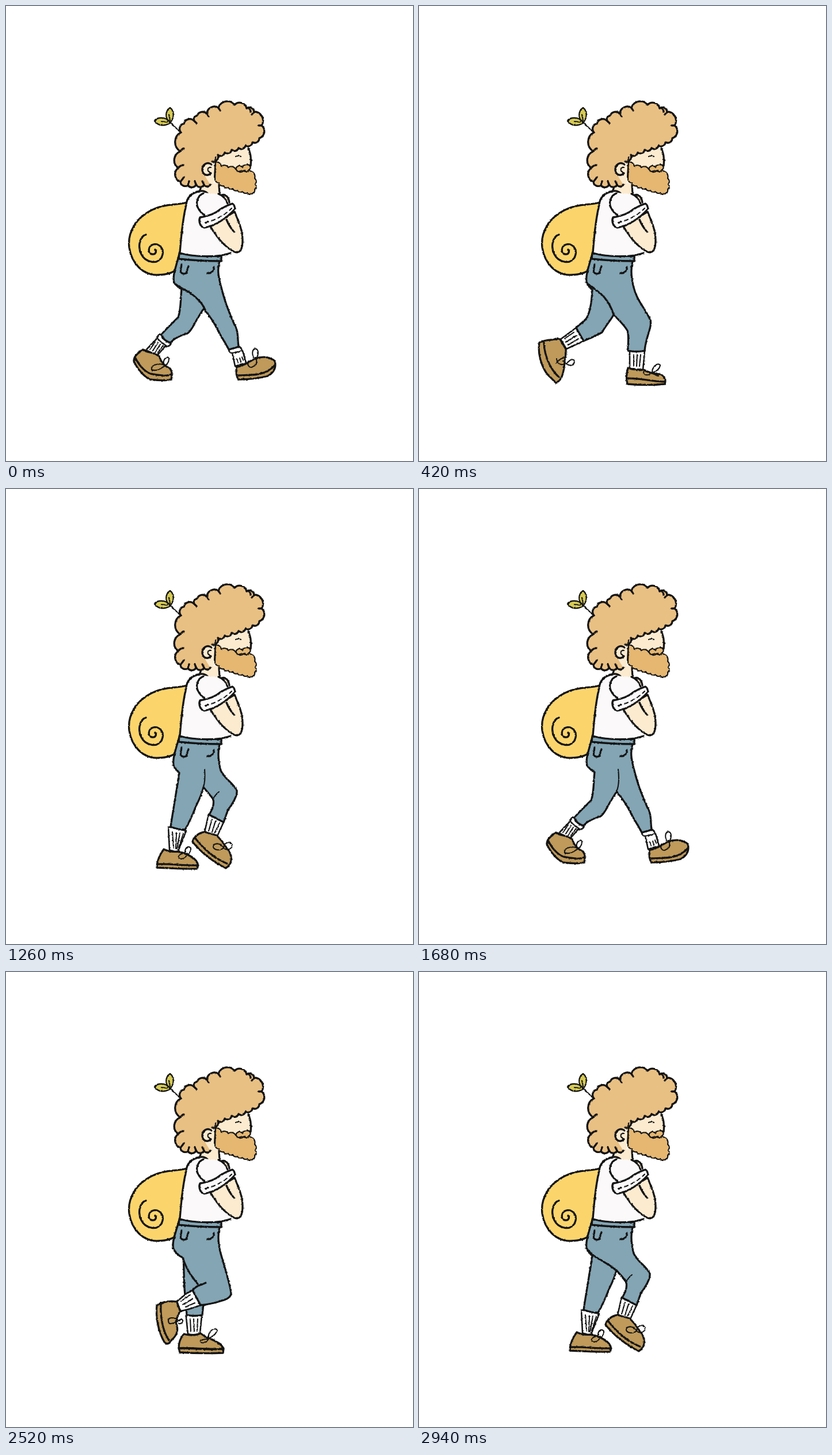
An HTML page that plays this animation: 707x792 px, repeating every 3360 ms.

```html
<!DOCTYPE html>
<html lang="en">
<head>
<meta charset="utf-8">
<title>Walking with a shell</title>
<style>
  html, body { margin: 0; width: 100%; height: 100%; overflow: hidden; background: #fff; }
  svg { display: block; width: 707px; height: 792px; }
  path { fill: none; stroke: #141414; stroke-width: 3.3; stroke-linecap: round; stroke-linejoin: round; }
  .fill { stroke: none; }
  .thin { stroke-width: 2.1; }
  .hair { fill: #e9c083; }
  .beard { fill: #e5b771; stroke-width: 2.2; }
  .skin { fill: #fdebd0; }
  .shirt { fill: #fbf9f9; }
  .shell { fill: #fbd56c; }
  .pants { fill: #83a5b4; }
  .sock { fill: #fff; stroke-width: 2.6; }
  .shoe { fill: #bf9a5a; }
  .leaf { fill: #d6ca54; stroke-width: 2.3; }
</style>
</head>
<body>
<svg viewBox="0 0 707 792">
  <filter id="ink" x="0" y="0" width="707" height="792" filterUnits="userSpaceOnUse" color-interpolation-filters="sRGB">
    <feTurbulence type="fractalNoise" baseFrequency=".3" numOctaves="2" seed="4"/>
    <feDisplacementMap in="SourceGraphic" scale="2.6" xChannelSelector="R" yChannelSelector="G"/>
  </filter>
  <g filter="url(#ink)">
    <path class="shell" d="M314 342C295 347 278 344 258 353C225 367 211 395 214 420C218 448 238 470 266 468C282 467 295 464 299 452L303 432L306 390Z"/>
    <path d="M243 398C231 402 229 420 235 432C242 446 262 451 270 438C277 425 267 412 256 415C246 418 246 431 254 432C260 433 262 427 259 424"/>

    <g id="stride">
      <path class="sock" d="M267 571C262 574 264 577 262 579L243 599L263 608L277 592C284 594 287 589 287 585Z"/>
      <path class="thin" d="M263 578Q269 586 278 591M259 585L250 598M264 586L255 600M268 589L259 603M273 591L264 603"/>
      <path class="shoe" d="M238 598C228 604 222 610 222 618C228 632 240 645 250 650C265 652 280 652 287 650C289 642 288 635 285 631C278 628 270 622 266 610C258 602 244 604 238 598Z"/>
      <path d="M225 613C232 628 246 641 256 641C268 643 280 645 287 641"/>
      <path class="thin" d="M278 627C268 620 251 624 253 633C262 637 270 630 278 625C285 618 284 609 279 612C273 615 273 621 275 625"/>
      <path class="sock" d="M388 598C386 602 390 604 393 604L398 627L417 621L411 600L406 593Z"/>
      <path class="thin" d="M393 604Q402 603 411 600M401 614L403 621M406 613L408 620M410 611L412 617"/>
      <path class="shoe" d="M400 629C400 640 400 645 404 650C420 650 440 648 455 644C465 638 470 630 467 618C455 608 440 611 432 614L418 622C410 627 403 627 400 629Z"/>
      <path d="M404 643C425 642 440 643 453 636C460 632 465 628 467 625"/>
      <path class="thin" d="M430 612C425 600 432 593 436 598C440 602 437 609 436 612M421 618C418 626 424 632 430 627C436 625 437 618 433 612"/>
      <path class="pants" d="M301 432C294 458 289 470 292 482Q298 489 305 493C303 510 304 530 299 542C288 553 276 564 270 572C272 580 280 585 286 586C292 578 305 573 315 570C322 566 326 555 332 545L343 527C355 540 362 552 369 566C375 578 382 588 387 598L404 593C402 580 404 565 397 555C388 535 380 515 374 490C370 475 366 460 371 444L374 437Z"/>
      <path class="front" d="M292 482C300 490 310 493 318 498C332 508 342 518 346 529"/>
      <path class="back thin" d="M346 488C348 505 347 518 343 527"/>
    </g>

    <g id="plant">
      <path class="sock" d="M273 560L246 580L256 597L286 583Z"/>
      <path class="thin" d="M269 568L253 579M273 574L255 585M277 579L259 590"/>
      <path class="shoe" d="M244 579C232 582 220 580 209 586C206 605 212 625 222 640L238 656C248 652 250 640 252 630C253 615 256 605 255 597Z"/>
      <path d="M217 586C218 610 228 632 243 646"/>
      <path class="thin" d="M239 614C241 628 253 626 262 617C270 612 273 620 266 625C260 627 255 622 250 618M238 622C243 615 247 614 252 612"/>
      <path class="sock" d="M366 600L366 631L389 633L392 600Z"/>
      <path class="thin" d="M373 607L373 626M379 607L378 627M385 607L383 627"/>
      <path class="shoe" d="M363 630C360 640 360 650 362 658C385 660 408 660 427 658C430 648 425 643 418 641C405 640 398 638 390 633C380 636 370 632 363 630Z"/>
      <path d="M362 648C385 648 410 654 427 654"/>
      <path class="thin" d="M405 638C405 628 414 620 419 625C418 633 410 637 405 638ZM392 634C386 640 395 646 404 639L416 644"/>
      <path class="pants" d="M301 432C293 458 288 475 292 484L301 494C300 515 297 535 290 545C283 552 277 556 273 560L286 583C298 578 308 574 318 568C325 555 335 545 338 537C345 545 355 553 362 565C365 575 363 585 363 600Q378 603 392 600C394 575 405 560 402 547C392 525 378 512 373 490C369 475 367 460 371 444L374 437Z"/>
      <path class="front" d="M292 482C302 494 326 499 338 537"/>
      <path class="back thin" d="M346 488C348 505 345 525 338 537"/>
    </g>

    <g id="pass">
      <path class="sock" d="M314 597L313 601L316 630Q327 633 337 629L340 598Z"/>
      <path class="thin" d="M320 604L321 625M326 604L327 626M333 604L332 625"/>
      <path class="shoe" d="M309 630C302 638 300 648 300 655L302 662C330 664 355 664 377 663L378 655C370 642 355 640 345 634L338 629C330 633 318 633 309 630Z"/>
      <path stroke-width="4" style="stroke-width:4" d="M301 655C325 654 350 658 377 656"/>
      <path class="thin" d="M352 638C350 625 362 618 367 623C366 630 358 635 352 638C347 648 336 647 338 641Q348 638 358 639L374 648"/>
      <path class="pants" d="M301 432C293 458 288 472 291 482C297 494 308 496 308 499C310 520 308 545 312 570L314 597Q328 600 341 597L343 577Z"/>
      <path class="sock" d="M324 554L313 560L294 576L304 590C315 588 325 585 338 580Z"/>
      <path class="thin" d="M320 562L304 573M324 569L307 579M328 576L312 583"/>
      <path class="shoe" d="M297 574C285 572 272 574 262 580C260 600 264 625 275 644C280 650 285 646 288 640C298 632 300 622 295 610C296 600 302 594 302 589Z"/>
      <path d="M269 578C268 600 272 625 283 641"/>
      <path class="thin" d="M302 607C285 597 278 604 284 612C292 613 298 607 305 604C309 607 307 613 300 612"/>
      <path class="pants fill" d="M301 432C293 458 288 472 291 482L307 497C312 515 322 530 333 543L324 554L338 580C348 579 360 577 372 573C380 571 390 567 391 560C390 545 380 515 373 490C369 475 367 460 371 444L374 437Z"/>
      <path d="M301 432C293 458 288 472 291 482Q298 494 307 497C312 515 322 530 333 543M347 541C338 545 330 546 324 554L338 580C348 579 360 577 372 573C380 571 390 567 391 560C390 545 380 515 373 490C369 475 367 460 371 444"/>
    </g>

    <g id="lift">
      <path class="sock" d="M282 588L284 628L298 633L313 595Z"/>
      <path class="thin" d="M289 597L291 624M296 598L295 626M302 599L297 627M308 600L300 624"/>
      <path class="shoe" d="M274 627C266 638 262 650 262 659C290 660 310 662 332 661C336 652 330 645 322 640C312 634 304 632 298 631C290 632 280 630 274 627Z"/>
      <path d="M263 653C290 652 310 656 334 655"/>
      <path class="thin" d="M311 635C310 625 316 620 321 625C322 633 315 637 311 641C305 646 298 644 300 638Q308 631 319 638"/>
      <path class="sock" d="M352 566L345 597L367 604L378 580Z"/>
      <path class="thin" d="M358 575L352 595M364 578L358 597M371 581L363 598"/>
      <path class="shoe" d="M345 597C335 598 326 606 324 614C340 634 362 650 382 660C389 655 394 648 390 636C388 628 380 622 376 614L366 603Z"/>
      <path d="M328 607C342 625 362 643 384 652"/>
      <path class="thin" d="M378 624C380 615 388 612 393 619C392 628 384 630 378 625C368 632 356 626 361 619Q370 614 378 624"/>
      <path class="pants" d="M301 432C293 458 288 475 292 484L301 494C298 515 290 560 286 588Q300 593 311 593C320 578 325 565 330 552C336 540 341 528 343 519C348 525 354 532 360 540C362 550 358 558 353 567L378 580L385 560C393 548 402 535 401 525C395 512 380 505 373 490C369 475 367 460 371 444L374 437Z"/>
      <path class="thin" d="M359 541Q363 532 370 527"/>
      <path class="front" d="M292 482C302 496 315 500 325 507C335 512 350 525 360 539"/>
      <path class="back thin" d="M345 488C346 502 346 510 343 519"/>
    </g>

    <path class="pants" d="M301 430L300 440C325 443 350 444 374 444L374 436Z"/>
    <path d="M305 450L303 463Q308 468 313 465L317 453M361 455C360 463 355 466 350 465"/>

    <path class="skin fill" d="M339 308L335 327L352 334L371 328V308Z"/>
    <path d="M340 312L335 326M370 311L371 328"/>
    <path class="shirt fill" d="M335 322C320 326 314 335 313 346C306 375 304 405 302 430C325 437 370 438 390 430V345L371 328L354 328Z"/>
    <path d="M338 322C320 325 314 335 313 346C306 375 304 405 302 430C325 437 370 438 390 430M338 322Q345 321 350 326"/>
    <path class="skin" d="M374 330C381 325 388 334 388 344L378 350Z"/>
    <path class="skin" d="M355 384C366 402 380 420 397 428C408 432 411 420 411 408C411 390 404 375 397 358Z"/>
    <path d="M383 372Q388 384 396 393"/>
    <path class="shirt fill" d="M345 325C332 330 329 345 335 354L343 368L390 347C384 338 378 331 371 328Z"/>
    <path d="M343 326C332 330 329 345 334 352Q338 360 345 364M369 327Q380 331 385 344"/>
    <path class="shirt" d="M337 368C350 366 362 363 372 354C380 349 387 346 393 344Q397 346 398 353C380 373 360 383 344 386C337 384 334 374 337 368Z"/>
    <path class="thin" stroke-dasharray="6 6" d="M346 377C361 374 379 365 392 352"/>

    <path class="thin" d="M302 219L286 203"/>
    <path class="leaf" d="M285 203C275 195 277 182 285 177C293 183 292 196 285 203ZM286 203C276 191 262 194 258 200C264 209 276 210 286 203Z"/>
    <path class="thin" d="M285 199L283 189M280 202L270 201"/>

    <path class="skin fill" d="M358 262L421 247Q427 262 425 282L400 305H362L357 312L338 312V275Z"/>
    <path d="M421 248Q427 260 425 278"/>
    <path class="thin" d="M399 262Q404 260 408 262"/>
    <path id="beard" class="beard"/>
    <path id="moustache" class="beard"/>
    <path class="thin" d="M405 288Q413 284 418 289"/>
    <path id="hairFill" class="hair fill"/>
    <path id="hairLine"/>
    <path d="M303 253Q306 248 309 248M299 282Q303 277 308 277M303 306L309 298M316 312L318 305M330 311L328 305M344 311L341 305M327 200L331 204M349 188L352 192M369 177L372 182M418 178Q424 176 425 184M431 184L427 189M444 208L439 208"/>
    <path class="skin" d="M357 276C350 270 340 276 341 286C342 294 350 297 356 291"/>
    <path class="thin" d="M356 281C349 280 349 288 355 290"/>
    <path class="thin" d="M364 263L362 298"/>
  </g>
</svg>
<script>
  const byId = id => document.getElementById(id);

  // Joins points with outward arcs; a larger roundness gives flatter bumps.
  const scallop = (points, roundness) => points.map(([x, y], i) => {
    if (!i) return `M${x} ${y}`;
    const r = Math.hypot(x - points[i - 1][0], y - points[i - 1][1]) * roundness;
    return `A${r} ${r} 0 0 1 ${x} ${y}`;
  }).join('');

  const curls = scallop([
    [355, 311], [344, 311], [330, 311], [316, 312], [303, 306], [299, 282], [303, 253],
    [304, 220], [309, 205], [327, 200], [332, 191], [349, 188], [369, 177], [397, 172],
    [418, 178], [431, 184], [444, 208], [440, 230], [428, 237], [416, 243], [404, 247],
    [392, 250], [380, 255], [368, 259], [358, 271]
  ], .57);
  byId('hairLine').setAttribute('d', curls);
  byId('hairFill').setAttribute('d', curls + 'L344 276L341 289Z');

  byId('beard').setAttribute('d', scallop([
    [364, 272], [374, 279], [386, 281], [399, 284], [424, 287], [432, 300], [433, 310],
    [432, 319], [428, 326], [419, 325], [411, 323], [402, 321], [394, 318], [386, 316],
    [378, 313], [370, 308], [363, 300]
  ], .66) + 'Z');
  byId('moustache').setAttribute('d', scallop([
    [400, 285], [403, 279], [411, 281], [417, 277], [424, 279], [422, 285], [413, 287], [400, 285]
  ], .65));

  // Each step: pose and which leg is nearer to the viewer.
  const steps = [
    ['stride', 'front'], ['plant', 'front'], ['pass', 'front'], ['lift', 'back'],
    ['stride', 'back'], ['plant', 'back'], ['pass', 'back'], ['lift', 'front']
  ];
  const stepMs = 420;
  const poses = ['stride', 'plant', 'pass', 'lift'].map(byId);
  const nearLines = document.querySelectorAll('.front, .back');
  const show = (element, visible) => { element.style.display = visible ? '' : 'none'; };

  function draw() {
    const [pose, near] = steps[Math.floor(performance.now() / stepMs) % steps.length];
    poses.forEach(group => show(group, group.id === pose));
    nearLines.forEach(line => show(line, line.classList.contains(near)));
    requestAnimationFrame(draw);
  }
  draw();
</script>
</body>
</html>
```
